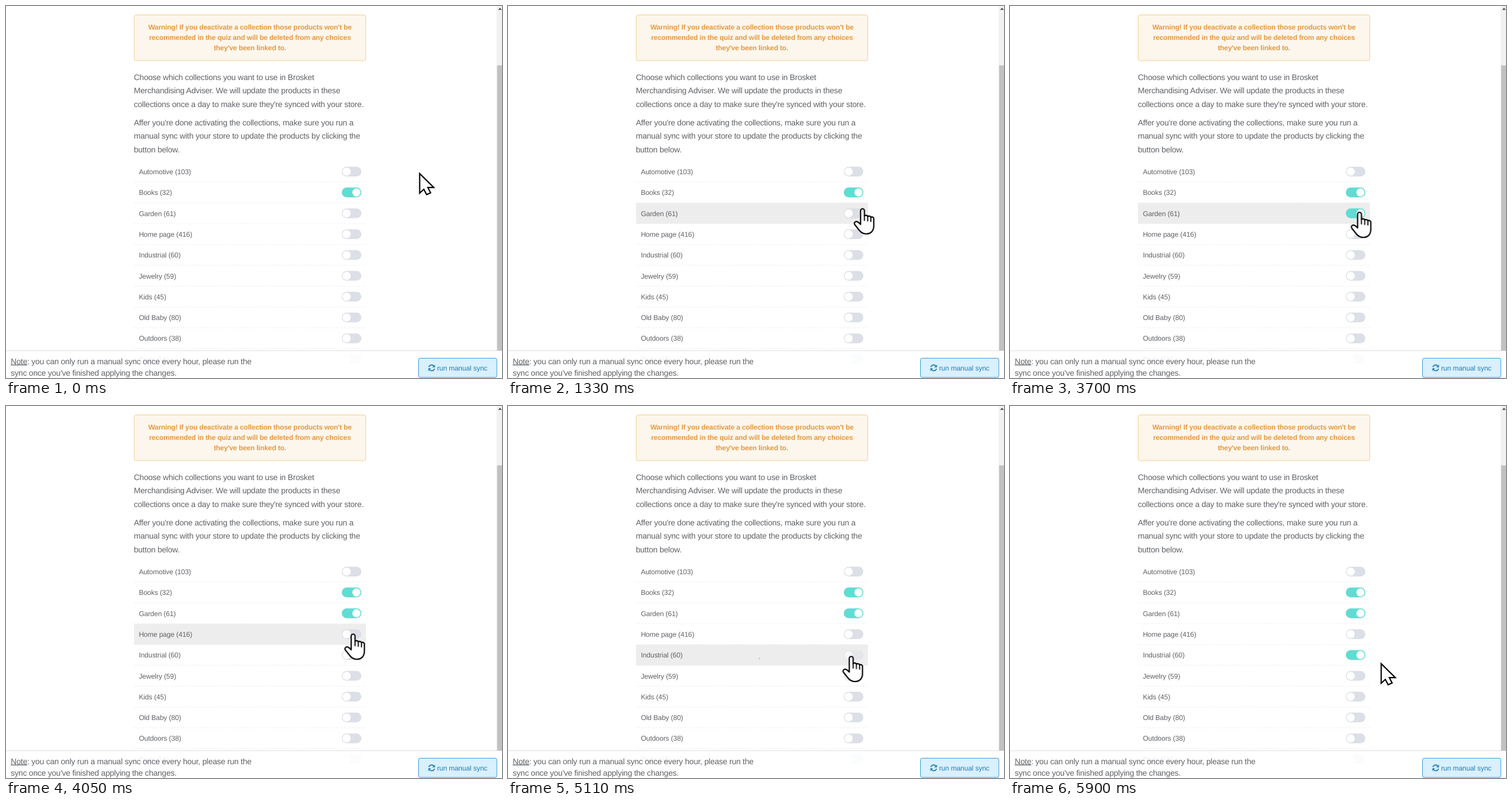
An HTML page that plays this animation: 864 by 648 pixels, repeating every 8 s.

```html
<!DOCTYPE html>
<html lang="en">
<head>
<meta charset="utf-8">
<title>Collections</title>
<style>
  @property --on { syntax: '<number>'; inherits: true; initial-value: 0; }

  html, body { margin: 0; width: 100%; height: 100%; overflow: hidden; background: #fff; }
  svg { display: block; width: 864px; height: 648px; }
  text { font: 14px 'Liberation Sans', Arial, sans-serif; letter-spacing: -.22px; fill: #606266; text-rendering: geometricPrecision; }
  .warn { font-size: 12.2px; font-weight: bold; letter-spacing: -.18px; fill: #e6993f; text-anchor: middle; }
  .small { font-size: 12.2px; letter-spacing: -.12px; }
  .rule { stroke: #ebeef5; stroke-dasharray: 3 2; }

  .off { fill: #dcdfe6; }
  .on { fill: #60dcd3; opacity: var(--on); }
  .knob { fill: #fff; transform: translateX(calc(var(--on) * 17px)); }
  .books { --on: 1; }
  .garden { animation: garden-on 8s infinite, dim 8s 2.03s infinite; }
  .industrial { animation: industrial-on 8s infinite, dim 8s 4.86s infinite; }

  .spin { fill: none; stroke: #409eff; stroke-width: 1.8; stroke-linecap: round;
    animation: turn 8s linear infinite both, dash 8s ease-in-out infinite both, show 8s linear infinite both; }
  .first { animation-delay: 2.24s; }
  .second { animation-delay: 5.02s; }

  #hover { fill: #ededed; animation: hover 8s step-end infinite; }
  #cursor { animation: move 8s linear infinite; }
  #cursor path { fill: #fff; stroke: #000; stroke-width: 2.2; }
  #arrow { animation: arrow 8s step-end infinite; }
  #hand { stroke-linejoin: round; stroke-linecap: round; animation: hand 8s step-end infinite; }

  @keyframes garden-on {
    0%, 35.5% { --on: 0; }
    38.8%, 100% { --on: 1; }
  }
  @keyframes industrial-on {
    0%, 70.6% { --on: 0; }
    73.6%, 100% { --on: 1; }
  }
  @keyframes dim {
    0% { opacity: 1; }
    2.6% { opacity: .6; }
    5%, 10.1% { opacity: .42; }
    13%, 100% { opacity: 1; }
  }
  @keyframes turn {
    0% { transform: rotate(0deg); }
    25%, 100% { transform: rotate(360deg); }
  }
  @keyframes dash {
    0% { stroke-dasharray: 1 200; stroke-dashoffset: 0; }
    9.375% { stroke-dasharray: 90 150; stroke-dashoffset: -40; }
    18.75%, 100% { stroke-dasharray: 90 150; stroke-dashoffset: -120; }
  }
  @keyframes show {
    0% { opacity: 0; }
    2.5%, 7.6% { opacity: .9; }
    10.8%, 100% { opacity: 0; }
  }
  @keyframes hover {
    0% { opacity: 0; transform: translateY(343.1px); }
    15.5% { opacity: 1; transform: translateY(343.1px); }
    48.7% { opacity: 1; transform: translateY(379.4px); }
    52.9% { opacity: 1; transform: translateY(415.7px); }
    69.6%, 100% { opacity: 0; transform: translateY(415.7px); }
  }
  @keyframes move {
    0%, 6.25% { transform: translate(720px, 290px); animation-timing-function: cubic-bezier(.333, 0, .667, 1); }
    18.625%, 45.875% { transform: translate(609.5px, 356.5px); }
    46.25% { transform: translate(608.5px, 358px); }
    53.5% { transform: translate(601.5px, 421px); }
    55.125% { transform: translate(597.5px, 435px); }
    65% { transform: translate(597.5px, 435px); animation-timing-function: cubic-bezier(.4, 0, .8, .8); }
    70.5% { transform: translate(635px, 449px); animation-timing-function: ease-out; }
    73.75%, 100% { transform: translate(646px, 447px); }
  }
  @keyframes arrow {
    0% { opacity: 1; }
    15.5% { opacity: 0; }
    69.6%, 100% { opacity: 1; }
  }
  @keyframes hand {
    0% { opacity: 0; }
    15.5% { opacity: 1; }
    69.6%, 100% { opacity: 0; }
  }
</style>
</head>
<body>
<svg viewBox="0 0 864 648">
  <rect x="223.3" y="15.5" width="403.4" height="79.6" rx="3.5" fill="#fdf6ec" stroke="#f4cb8c"/>
  <text class="warn" x="425" y="41.2">Warning! If you deactivate a collection those products won't be</text>
  <text class="warn" x="425" y="59.2">recommended in the quiz and will be deleted from any choices</text>
  <text class="warn" x="425" y="77.2">they've been linked to.</text>

  <text x="222.7" y="128.5">Choose which collections you want to use in Brosket</text>
  <text x="222.7" y="152.1">Merchandising Adviser. We will update the products in these</text>
  <text x="222.7" y="175.7">collections once a day to make sure they're synced with your store.</text>
  <text x="222.7" y="207.7">Affer you're done activating the collections, make sure you run a</text>
  <text x="222.7" y="231.3">manual sync with your store to update the products by clicking the</text>
  <text x="222.7" y="254.9">button below.</text>

  <rect id="hover" x="223" width="404" height="36.2"/>
  <g id="rows"></g>
  <g transform="translate(425 361.5)"><circle class="spin first" r="14.3" pathLength="125.66"/></g>
  <g transform="translate(425 434)"><circle class="spin second" r="14.3" pathLength="125.66"/></g>

  <rect x="854.5" width="9.5" height="600" fill="#f1f1f1"/>
  <rect x="855.5" y="103.5" width="8.5" height="497" fill="#c1c1c1"/>
  <path d="M857.2 6.7l3.3-3.6 3.3 3.6z" fill="#505050"/>

  <rect y="600" width="864" height="48" fill="#fff" fill-opacity=".89"/>
  <rect x="854" y="601" width="10" height="47" fill="#fff"/>
  <path d="M0 600.5H864" stroke="#dcdcdc"/>
  <text x="8.3" y="623.6"><tspan text-decoration="underline">Note</tspan>: you can only run a manual sync once every hour, please run the</text>
  <text x="8.3" y="643.8">sync once you've finished applying the changes.</text>

  <rect x="718.5" y="613.5" width="136.5" height="33.5" rx="3" fill="#d9f0fe" stroke="#359bd3"/>
  <g transform="translate(741.5 630.3)" fill="#2580b8">
    <g id="half">
      <path d="M-4.9-1.4A5 5 0 0 1 3.8-3.2" fill="none" stroke="#2580b8" stroke-width="1.8"/>
      <path d="M5.8-5.6v4.8H1z"/>
    </g>
    <use href="#half" transform="rotate(180)"/>
  </g>
  <text class="small" x="750.9" y="634.6" style="fill:#2580b8">run manual sync</text>

  <g id="cursor">
    <path id="arrow" d="M.6 2V36L7.800 29.200 12.700 38.500 19.600 35.500 14.800 26.200H25.200z"/>
    <g id="hand" transform="translate(-15 0)">
      <path d="M12 27V4.600a3.300 3.300 0 0 1 6.700 0V14c1-2.200 5.400-1.800 5.700 1 1-1.800 5.200-1.300 5.500 1.300 1.400-1.600 5.100-.8 5.100 2.400V31C35 40 29.500 45 22 45 15.500 45 12.500 42.500 9.500 38.500L2 29C-.3 25.900 3.300 22 6.800 24Q9.500 25.500 12 28.500z"/>
      <path d="M18.700 14V21.500M24.400 15V22.500M29.900 16.500V23.500" style="stroke-width:1.9"/>
    </g>
  </g>
</svg>
<script>
  const rows = ['Automotive (103)', 'Books (32)', 'Garden (61)', 'Home page (416)', 'Industrial (60)',
    'Jewelry (59)', 'Kids (45)', 'Old Baby (80)', 'Outdoors (38)', 'Tools (52)'];

  const toggle = name => `<g class="${name}">
    <rect class="off" x="585" y="-8.5" width="34" height="17" rx="8.5"/>
    <rect class="on" x="585" y="-8.5" width="34" height="17" rx="8.5"/>
    <circle class="knob" cx="593.4" r="7.1"/></g>`;

  document.getElementById('rows').innerHTML = rows.map((label, i) => `
    <g transform="translate(0 ${288.5 + 36.3 * i})">
      <text class="small" x="231.4" y="4.5">${label}</text>
      ${toggle(label.split(' ')[0].toLowerCase())}
      <path class="rule" d="M223 18H627"/>
    </g>`).join('');
</script>
</body>
</html>
```
